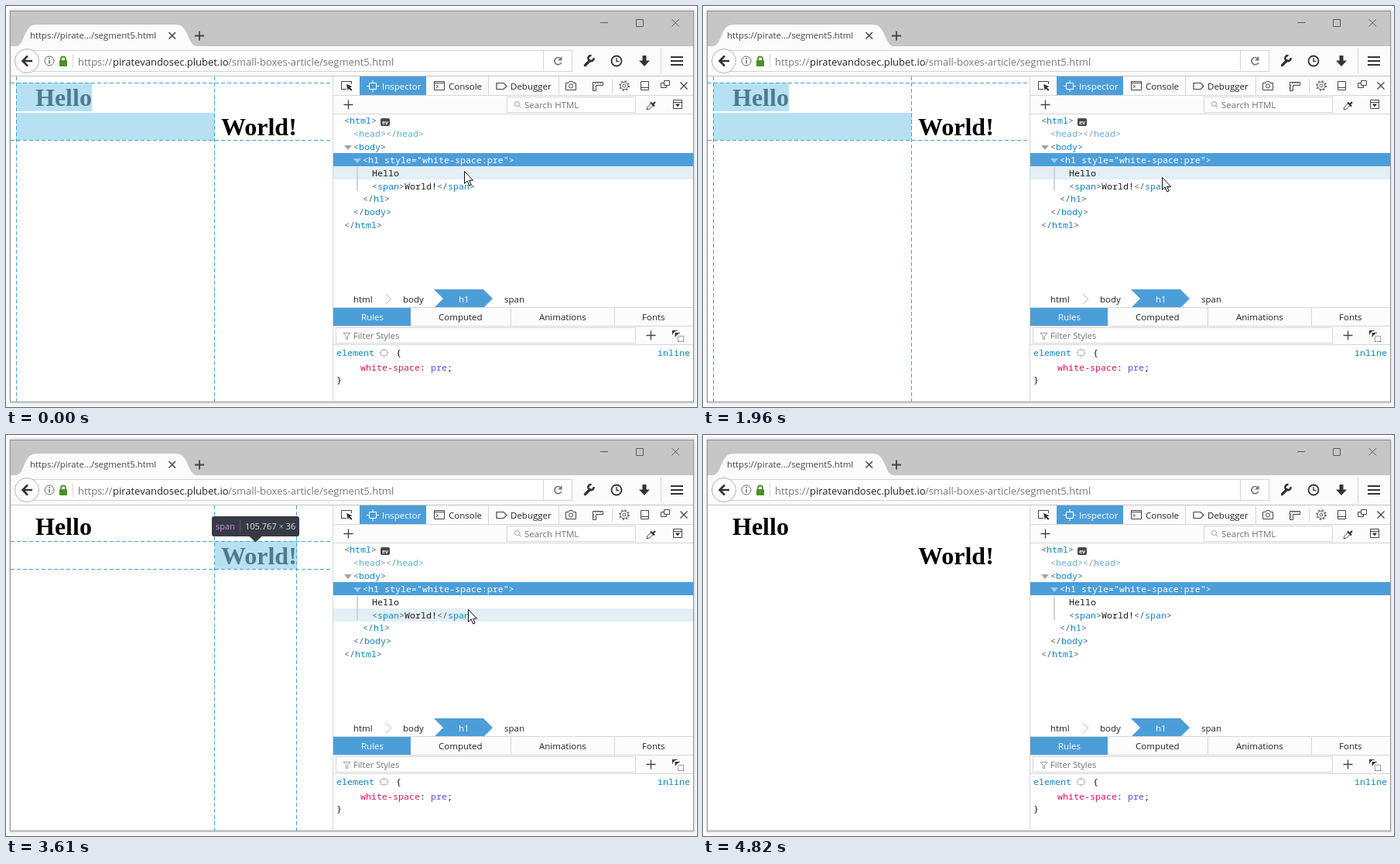
Recreate the animation shown at these times as an HTML page. Size 893 by 518 pixels, loop 5.26 s.

```html
<!DOCTYPE html>
<html lang="en">
<head>
<meta charset="utf-8">
<title>Whitespace inspector</title>
<style>
html, body { margin: 0; width: 100%; height: 100%; overflow: hidden; background: #fff; }
svg { display: block; width: 893px; height: 518px; }
text { white-space: pre; font: 11.5px "Open Sans", "Noto Sans", sans-serif; fill: #222; }
.url text { font-size: 13px; fill: #777; }
.page text { font: bold 32px "Liberation Serif", "Times New Roman", serif; fill: #000; }
.code text { font: 11.67px "Noto Sans Mono", "DejaVu Sans Mono", monospace; fill: #18191a; }
.info text { font-size: 11px; fill: #dfe3e8; }
.code .tag, .tag { fill: #0a84c4; }
.code .punct { fill: #4f6472; }
.code .prop { fill: #d9145e; }
.code .value { fill: #5b4be8; }
.code .on { fill: #fff; }
.hint { fill: #707070; }
.white { fill: #fff; }
.crisp { shape-rendering: crispEdges; }
.line { fill: none; stroke: #444; }
.guide { fill: none; stroke: #3ba3d8; stroke-dasharray: 5 3; shape-rendering: crispEdges; }
.sep { fill: none; stroke: #d6d6d6; shape-rendering: crispEdges; }
.glow { fill: #87ceeb; opacity: .6; shape-rendering: crispEdges; }
.hover { fill: #e3eef5; }
.blue { fill: #4c9ed9; }
</style>
</head>
<body>
<svg viewBox="0 0 893 518">
  <!-- window -->
  <rect x="2" y="2" width="891" height="515" rx="7" fill="#f5f5f5"/>
  <rect x="4" y="4" width="887" height="510" rx="4" fill="#e6e6e6"/>
  <g class="crisp">
    <rect x="5" y="6" width="884" height="506" fill="#929292"/>
    <rect x="6" y="7" width="882" height="45" fill="#c6c6c6"/>
    <rect x="6" y="52" width="882" height="39" fill="#fbfbfb"/>
    <rect x="6" y="91" width="882" height="420" fill="#fff"/>
  </g>
  <path d="M13 52C14.200 51.800 18.400 50.200 20.700 45.200 29 27.300 29.500 24 43 24H216C229.500 24 230 27.300 238.300 45.200 240.600 50.200 244.800 51.800 246 52Z" fill="#fbfbfb"/>
  <path class="sep" d="M6 90.5H888" style="stroke:#c4c4c4"/>
  <text x="31" y="42" style="font-size:11.4px;fill:#444">https://pirate.../segment5.html</text>
  <path class="line" stroke-width="1.5" d="M210.500 34l8.500 8.500m0-8.500l-8.500 8.500"/>
  <path class="line" stroke-width="1.8" d="M244 38.500h12m-6-6v12"/>
  <path class="line" style="stroke:#5a5a5a" d="M768 21.500h10M814.500 17.500h9v9h-9zM860.500 17l9.500 9.500m0-9.500l-9.500 9.500"/>

  <!-- navigation bar -->
  <path class="crisp" d="M28.500 57.500H731.500V84.500H28.500" fill="#fff" stroke="#d2d2d2"/>
  <circle cx="27" cy="71" r="15.500" fill="#fff" stroke="#b2b2b2"/>
  <path d="M34 71H22m6-6.500L21.500 71l6.500 6.500" fill="none" stroke="#333" stroke-width="2.600"/>
  <circle class="line" cx="56" cy="71" r="6" style="stroke:#666"/>
  <path d="M56 70v4.500M56 67v1.700" stroke="#666" stroke-width="1.500"/>
  <rect x="69" y="70" width="10" height="8" rx="1" fill="#4a9029"/>
  <path d="M71 71v-2.500a3 3 0 0 1 6 0V71" fill="none" stroke="#4a9029" stroke-width="1.800"/>
  <path class="sep" d="M86.500 62V80M694.500 58V84M846.500 54V88"/>
  <g class="url">
    <text x="93" y="77">https://</text>
    <text x="138" y="77" style="fill:#222">piratevandosec.plubet.io</text>
    <text x="287" y="77">/small-boxes-article/segment5.html</text>
  </g>
  <path d="M717 68a4.600 4.600 0 1 0 .8 5" fill="none" stroke="#777" stroke-width="1.700"/>
  <path d="M718.500 65v5.500H713z" fill="#777"/>
  <path d="M748.500 76.500l6-6" stroke="#333" stroke-width="3.400" stroke-linecap="round"/>
  <path d="M759.500 67a3.600 3.600 0 1 1-3-3" fill="none" stroke="#333" stroke-width="2.600"/>
  <circle class="line" cx="789" cy="71" r="6.500" stroke-width="1.800" style="stroke:#333"/>
  <path class="line" d="M789 67v4.500h3.500" stroke-width="1.500"/>
  <path d="M822.500 64h5v6.500h4.500L825 78l-7-7.500h4.500z" fill="#333"/>
  <path class="crisp" d="M859 66h16m-16 5h16m-16 5h16" stroke="#333" stroke-width="2.400"/>

  <!-- page -->
  <g class="page">
    <text x="38" y="129">Hello</text>
    <text x="278" y="167">World!</text>
  </g>
  <g id="textBox">
    <rect class="glow" x="13" y="99" width="98" height="37"/>
    <rect class="glow" x="13" y="138" width="257" height="35"/>
    <path class="guide" d="M6 99.500H422M6 173.500H422M13.500 91V511M269.500 91V511"/>
  </g>
  <g id="spanBox" class="info">
    <rect class="glow" x="270" y="137" width="106" height="36"/>
    <path class="guide" d="M6 137.500H422M6 173.500H422M269.500 91V511M375.500 91V511"/>
    <rect x="266" y="105" width="113" height="26" rx="3" fill="#373a45"/>
    <path d="M314 130.500h17l-8.500 8z" fill="#373a45"/>
    <path d="M302.500 110v16" stroke="#5a5f6b"/>
    <text x="271" y="122" style="fill:#d08cf5">span</text>
    <text x="309" y="122">105.767 <tspan fill="#7fb4e0">×</tspan> 36</text>
  </g>

  <!-- inspector toolbar -->
  <g class="crisp">
    <rect x="422" y="91" width="466" height="420" fill="#fff"/>
    <rect x="423" y="91" width="465" height="49" fill="#fcfcfc"/>
    <rect class="blue" x="457" y="91" width="86" height="24"/>
    <path class="sep" d="M422.500 91V511M423 115.500H888M423 139.500H888M623.500 91V115M714.500 91V115M783.500 94V112"/>
    <rect x="647.500" y="117.500" width="166" height="20" fill="#fff" stroke="#d6d6d6"/>
  </g>
  <path class="line" d="M440 107.500h-6.500v-10h13V101"/>
  <path d="M440 101l7.500 3-3 1.200 3 3-1.500 1.500-3-3-1.200 2.800z" fill="#333"/>
  <path class="line" style="stroke:#fff" d="M469.500 99.500h9v8h-9zM474 96v3m0 9v3M466 103.500h3m10 0h3"/>
  <text class="white" x="486" y="108">Inspector</text>
  <path class="line" d="M553.500 97.500h13v11h-13zM553.500 99.500h13M556 102l2.500 2-2.500 2"/>
  <text x="572" y="108">Console</text>
  <path class="line" stroke-width="1.200" d="M634 99.500h9l4 4-4 4h-9z"/>
  <text x="652" y="108">Debugger</text>
  <path class="line" d="M723.500 99.500h3.500l1-2h4l1 2h3.500v9h-13z"/>
  <circle class="line" cx="730" cy="103.500" r="2.500"/>
  <path class="line" d="M758.500 109.500v-11h13v4h-9v7zM762 98.500v2m3-2v2m3-2v2M758.500 103h2m-2 3h2"/>
  <circle class="line" cx="799" cy="103" r="4.800" style="stroke:#666"/>
  <circle class="line" cx="799" cy="103" r="2" style="stroke:#666"/>
  <circle class="line" cx="799" cy="103" r="6" stroke-width="1.800" stroke-dasharray="2 2.712" style="stroke:#666"/>
  <path class="line" d="M820.500 97.500h10v11h-10zM820.500 105.500h10M850.500 96.500h7v6h-7zM850 99.500h-3.500v6h7v-3"/>
  <path class="line" stroke-width="1.300" d="M871.500 98.500l9 9m0-9l-9 9"/>
  <path class="line" stroke-width="1.300" d="M436.500 127.500h12m-6-6v12"/>
  <circle class="line" cx="660.500" cy="126.500" r="3" style="stroke:#999"/>
  <path d="M662.500 128.500l3 3" stroke="#999"/>
  <text class="hint" x="670" y="132">Search HTML</text>
  <path class="line" d="M828 134l1-3.500 5-5 2.500 2.500-5 5z"/>
  <path d="M833 124.500l5 5M836.500 126.500l2.500-2.500" stroke="#333" stroke-width="2.200"/>
  <path class="line" d="M862.500 121.500h11v11h-11zM862.500 124.500h11"/>
  <path d="M865 126.500h6l-3 4z" fill="#333"/>

  <!-- markup tree -->
  <g class="crisp">
    <rect class="blue" x="423" y="190" width="465" height="17"/>
    <rect id="textRow" class="hover" x="423" y="207" width="465" height="17"/>
    <rect id="spanRow" class="hover" x="423" y="224" width="465" height="17"/>
    <rect x="453" y="208" width="2" height="31" fill="#d0d3d6"/>
  </g>
  <path d="M437 180h10l-5 6z" fill="#a5a5a5"/>
  <path d="M449 197h10l-5 6z" fill="#9fcdf0"/>
  <g class="code" id="tree"></g>
  <rect x="484" y="145" width="12" height="10" rx="2" fill="#45484d"/>
  <text x="486" y="152.500" style="font-size:7px;font-weight:bold;fill:#fff">ev</text>

  <!-- breadcrumbs and side tabs -->
  <path class="blue" d="M553 366H617L629 378 617 390H553L565 378Z"/>
  <path d="M491 372l7 6.500-7 6.500" fill="none" stroke="#b5b5b5"/>
  <text x="449" y="383">html</text>
  <text x="513" y="383">body</text>
  <text class="white" x="585" y="383">h1</text>
  <text x="644" y="383">span</text>
  <g class="crisp">
    <rect x="423" y="390" width="465" height="48" fill="#fcfcfc"/>
    <path class="sep" d="M423 389.500H888M423 413.500H888M423 437.500H888M652.500 390V413M786.500 390V413"/>
    <rect class="blue" x="423" y="390" width="100" height="23"/>
    <rect x="426.500" y="415.500" width="387" height="20" fill="#fff" stroke="#d6d6d6"/>
  </g>
  <text class="white" x="459" y="406">Rules</text>
  <text x="559" y="406">Computed</text>
  <text x="689" y="406">Animations</text>
  <text x="822" y="406">Fonts</text>
  <path class="line" style="stroke:#999" d="M436 422.500h9l-3.500 4v4h-2v-4z"/>
  <text class="hint" x="449" y="430" style="font-size:11.200px">Filter Styles</text>
  <path class="line" stroke-width="1.300" d="M827.500 425.500h12m-6-6v12"/>
  <path class="line" d="M867.500 419.500h-6v5M871 422.500h-6v5"/>
  <path d="M861 419h5l-5 5zM865 422h5l-5 5z" fill="#333"/>
  <rect class="line crisp" x="868.500" y="426.500" width="7" height="7" stroke-dasharray="1 1"/>

  <!-- rules -->
  <g class="code">
    <text class="tag" x="427" y="452">element</text>
    <text x="504" y="452">{</text>
    <text class="tag" x="842" y="452">inline</text>
    <text x="458" y="471"><tspan class="prop">white-space</tspan>: <tspan class="value">pre</tspan>;</text>
    <text x="427" y="487">}</text>
  </g>
  <path class="line" style="stroke:#b8b8b8" d="M484.500 444.500h8v7h-8zM488.500 442v2m0 8v2M482 448h2m9 0h2"/>

  <path id="cursor" d="M.5.5V16.500L4.200 13 6.800 19 9.200 18 6.600 12.200H11.500Z" fill="#fff" stroke="#111"/>
</svg>
<script>
const el = id => document.getElementById(id);

// Wraps the brackets and the tag name of a line such as "</h1>".
const paint = s => s.replace(/<(\/?)(\w+)>/g, (_, slash, name) =>
  `<tspan class="punct">&lt;${slash}</tspan><tspan class="tag">${name}</tspan><tspan class="punct">&gt;</tspan>`);

const lines = [
  [437, "<html>"], [449, "<head></head>"], [449, "<body>"],
  [461, '&lt;h1 style="white-space:pre"&gt;'], [473, "Hello"],
  [473, "<span>World!</span>"], [461, "</h1>"], [449, "</body>"], [437, "</html>"]
];
el("tree").innerHTML = lines.map(([x, s], i) =>
  `<text x="${x}" y="${Math.round(152 + i * 16.9)}"${i === 3 ? ' class="on"' : ""}${i === 1 ? ' opacity=".65"' : ""}>${paint(s)}</text>`
).join("");

// time, hovered row, pointer x, pointer y
const LOOP = 5260;
const steps = [
  [0, "text", 592, 213],
  [400, "text", 592, 217], [450, "text", 591, 222], [490, "span", 590, 228], [540, "span", 590, 232],
  [1130, "span", 589, 230], [1190, "span", 590, 226], [1250, "text", 591, 219], [1310, "text", 592, 215],
  [1960, "text", 593, 221], [2010, "span", 594, 225], [2050, "span", 595, 227], [2090, "span", 596, 229],
  [2130, "span", 596, 230],
  [2750, "span", 596, 226], [2810, "text", 596, 220], [2870, "text", 596, 217],
  [3610, "span", 597, 225], [3680, "span", 600, 231],
  [4110, "span", 615, 232], [4160, "span", 636, 233], [4220, "span", 664, 234],
  [4280, "span", 692, 234], [4340, "span", 712, 235], [4400, "span", 722, 235],
  [4730, "span", 770, 235], [4770, "span", 850, 236], [4820, "", 900, 236]
];

const show = (id, on) => { el(id).style.display = on ? "" : "none"; };
const start = performance.now();
let last;

function draw() {
  const t = (performance.now() - start) % LOOP;
  const step = steps.findLast(s => s[0] <= t) || steps[0];
  if (step !== last) {
    const [, row, x, y] = last = step;
    for (const name of ["text", "span"]) {
      show(name + "Box", row === name);
      show(name + "Row", row === name);
    }
    show("cursor", row);
    el("cursor").setAttribute("transform", `translate(${x} ${y})`);
  }
  requestAnimationFrame(draw);
}
draw();
</script>
</body>
</html>
```
